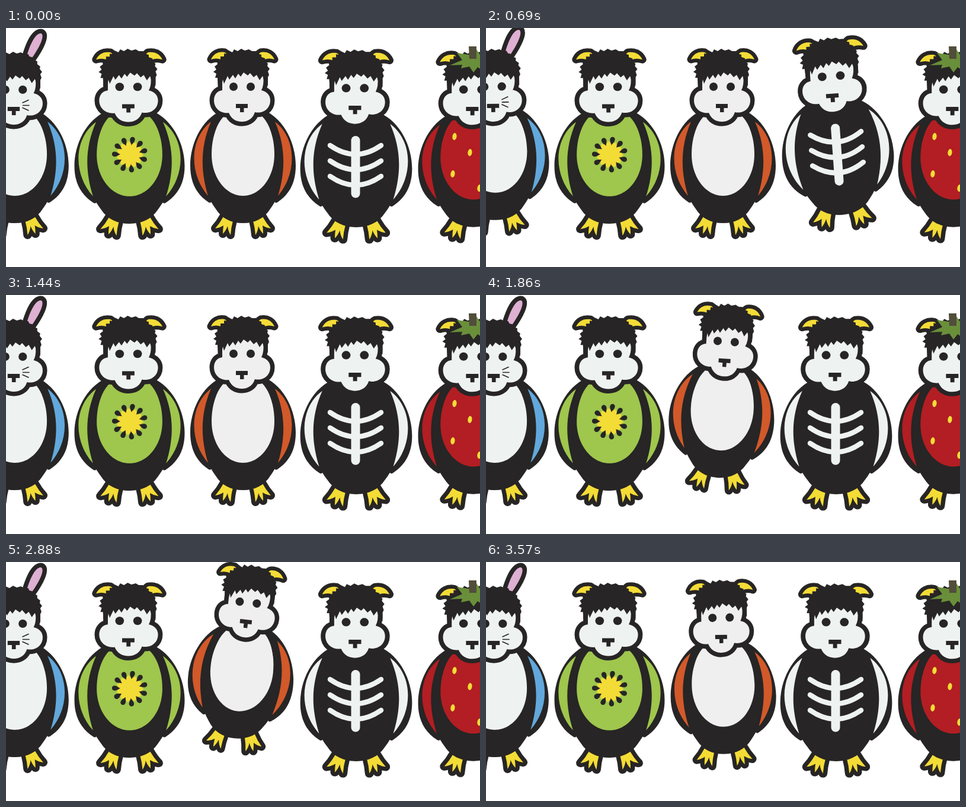
Animation of 800x403 px, one loop 3600 ms. Source, as an HTML page:

```html
<!DOCTYPE html>
<html lang="en">
<head>
<meta charset="utf-8">
<title>Hopping birds</title>
<style>
html, body { margin: 0; width: 100%; height: 100%; overflow: hidden; background: #fff; }
svg { display: block; width: 100%; height: 100%; }
</style>
</head>
<body>
<svg id="stage" viewBox="0 0 800 403" xmlns="http://www.w3.org/2000/svg"></svg>
<script>
const LOOP = 3600, STEP = 30;
const INK = '#272525', YELLOW = '#f4dc36', PALE = '#eef2f1', GREY = '#efefef';
const stage = document.getElementById('stage');

const path = (d, fill, more = '') => `<path d="${d}" fill="${fill}" ${more}/>`;
const line = (d, color, width) =>
  path(d, 'none', `stroke="${color}" stroke-width="${width}" stroke-linecap="round"`);
const outlined = (d, fill, width) =>
  path(d, fill, `stroke="${INK}" stroke-width="${width}" stroke-linejoin="round" paint-order="stroke"`);
const mirror = s => `<g transform="scale(-1 1)">${s}</g>`;
const both = s => s + mirror(s);

const BODY = 'M-36 142C-60 162-69 203-69 235C-69 262-60 286-46 305C-36 321-20 329 0 329' +
  'C20 329 36 321 46 305C60 286 69 262 69 235C69 203 60 162 36 142Z';
const BELLY = 'M-53 213C-53 252-29 283 0 283C29 283 53 252 53 213C53 175 37 140 12 140H-12C-37 140-53 175-53 213Z';
const WING = 'M-38 140C-70 155-89 195-89 232C-89 260-79 280-58 294Q-54 296-53 292C-62 262-62 215-44 165Z';
const CRESCENT = 'M-54 158C-90 185-92 245-59 283C-72 240-72 200-54 158Z';
const FOOT = 'M-33 318Q-25 324-17 325Q-20 336-21 349Q-25 343-26 334Q-29 342-34 347Q-34 340-33 333Q-39 337-47 338Q-39 329-33 318Z';
const FACE = 'M-35 105L-35 84L-20 72L20 72L34 80Q36 96 31 105C40 107 46 113 46 122' +
  'C46 136 34 145 20 142C17 152 9 158-2 158C-12 158-20 153-24 143' +
  'C-38 145-49 135-49 122C-49 113-44 106-35 105Z';
const HAIR = 'M-42 97L-43 84L-47 84L-45 77L-50 74L-45 70L-48 65L-43 61L-44 55L-38 54L-38 48L-32 48' +
  'L-32 43L-26 44L-24 38L-18 41L-15 36L-9 39L-3 35L3 38L10 36L15 39L22 39L24 43L31 45L31 49' +
  'L37 51L37 56L42 60L41 64L45 69L42 73L44 79L42 83L42 97L36 97Q36 87 33 81L28 88L23 79L18 83' +
  'L12 76L8 80L1 75L-4 82L-8 77L-13 85L-17 79L-23 87L-26 81L-32 94L-34 87L-36 97Z';
const EAR = 'M-54 53C-50 44-42 39-31 41Q-27 43-28 46L-37 53Q-45 50-54 53Z';

function bird(o) {
  const wing = path(WING, INK) + path(CRESCENT, o.wing);
  const ear = outlined(EAR, YELLOW, 13);
  const size = `translate(${o.x} ${o.y || 0}) scale(${o.sx || 1} ${o.sy || 1})`;
  return `<g id="${o.id}"><g transform="${size}">` +
    both(outlined(FOOT, YELLOW, 14)) +
    path(BODY, INK) +
    (o.belly ? path(BELLY, o.belly) : '') +
    `<g class="wing">${wing}</g><g class="wing">${mirror(wing)}</g>` +
    (o.chest ? `</g>${o.chest}<g transform="${size}">` : '') +
    `<g transform="translate(0 ${o.drop || 0})">` +
    (o.noEars ? '' : ear + `<g transform="translate(-1)">${mirror(ear)}</g>`) +
    outlined(FACE, o.face || PALE, 15) + path(HAIR, INK) +
    `<circle cx="-16" cy="99" r="7" fill="${INK}"/><circle cx="13" cy="99" r="7" fill="${INK}"/>` +
    path('M-12 128H8V135H1.500V142H-5V135H-12Z', INK) +
    `</g></g>${o.top || ''}</g>`;
}

// Kiwi core: a star with a seed on every point.
function kiwiCore() {
  const n = 11, pts = [];
  let seeds = '';
  for (let i = 0; i < n * 2; i++) {
    const a = Math.PI * i / n, r = i % 2 ? 23 : 18;
    pts.push((r * Math.sin(a)).toFixed(1) + ',' + (-r * Math.cos(a)).toFixed(1));
  }
  for (let i = 0; i < n; i++) {
    seeds += path('M0-16C-1.500-20-4.200-22-4.200-26A4.200 4.200 0 0 1 4.200-26C4.200-22 1.500-20 0-16Z',
      INK, `transform="rotate(${i * 360 / n})"`);
  }
  return `<g transform="translate(209 213.500) rotate(10)"><polygon points="${pts.join(' ')}" fill="${YELLOW}"/>${seeds}</g>`;
}

const bones = line('M590 189.500V279', PALE, 15) +
  [198, 224, 250].map(y => line(`M547 ${y}Q590 ${y + 30} 633 ${y}`, PALE, 8.5)).join('');

const pips = [[757, 183], [783, 210], [754, 246], [799, 270]].map(([x, y]) =>
  `<ellipse cx="${x}" cy="${y}" rx="3.600" ry="6" fill="${YELLOW}" transform="rotate(8 ${x} ${y})"/>`).join('');

const leaf = path('M749 63L770 54L761 42L781 45L794 36L800 45L816 40L810 54L830 63L808 64' +
  'L803 71L796 66L789 75L782 65L768 68L770 62Z', '#6a8f3a') +
  path('M781 31H794V52H782Z', '#514d3b');

const bunnyEar = outlined('M33 53C38 36 47 9 59 9C66 12 58 31 42 53Z', '#deb0d2', 15);
const bunnyEars = bunnyEar + `<g transform="translate(26) scale(-1 1)">${bunnyEar}</g>`;
const whiskers = line('M28 126L38 121.500M28.500 130.500H39M28 134.500L38 139', INK, 1.6);

const RED = '#b21e23', GREEN = '#9fc64d';
stage.innerHTML =
  bird({ id: 'bunny', x: 15, sx: 1.02, drop: 5, wing: '#62a8dc', belly: PALE, noEars: true,
    chest: bunnyEars, top: whiskers }) +
  bird({ id: 'kiwi', x: 208.5, sx: 1.045, sy: 1.003, wing: GREEN, belly: GREEN, chest: kiwiCore() }) +
  bird({ id: 'bones', x: 591, y: 0.5, sx: 1.06, sy: 1.02, wing: PALE, chest: bones }) +
  bird({ id: 'berry', x: 789, y: 4, sx: 1.05, sy: 1.008, wing: RED, belly: RED, chest: pips, top: leaf }) +
  bird({ id: 'plain', x: 400, wing: '#d2592a', belly: GREY, face: GREY });

const node = id => document.getElementById(id);
const wings = document.querySelectorAll('#plain .wing');

// Linear rise and fall between 0 and 1.
const rise = (t, start, up = 180, down = 180) =>
  Math.max(0, Math.min((t - start) / up, (start + up + down - t) / down));

function hop(id, x, k, tilt, height = 31) {
  node(id).setAttribute('transform', `translate(0 ${-height * k}) rotate(${tilt * k} ${x} 195)`);
}

function draw(t) {
  hop('bunny', 15, rise(t, 360), -6.2);
  hop('bones', 591, rise(t, 570), -6.2);
  hop('kiwi', 208.5, rise(t, 1470), 6.2);
  hop('berry', 789, rise(t, 2100, 240, 180), 6, 36);

  const beat = Math.floor(t / 540);
  hop('plain', 400, beat < 2 ? 0 : rise(t, beat * 540), beat % 2 ? 6.2 : -6.2);

  const flap = 17.5 * rise(t, 0, 270, 270);
  wings[0].setAttribute('transform', `rotate(${flap} -50 150)`);
  wings[1].setAttribute('transform', `rotate(${-flap} 50 150)`);
}

const begin = performance.now();
function tick() {
  const t = (performance.now() - begin) % LOOP;
  draw(Math.floor(t / STEP) * STEP);
  requestAnimationFrame(tick);
}
tick();
</script>
</body>
</html>
```
